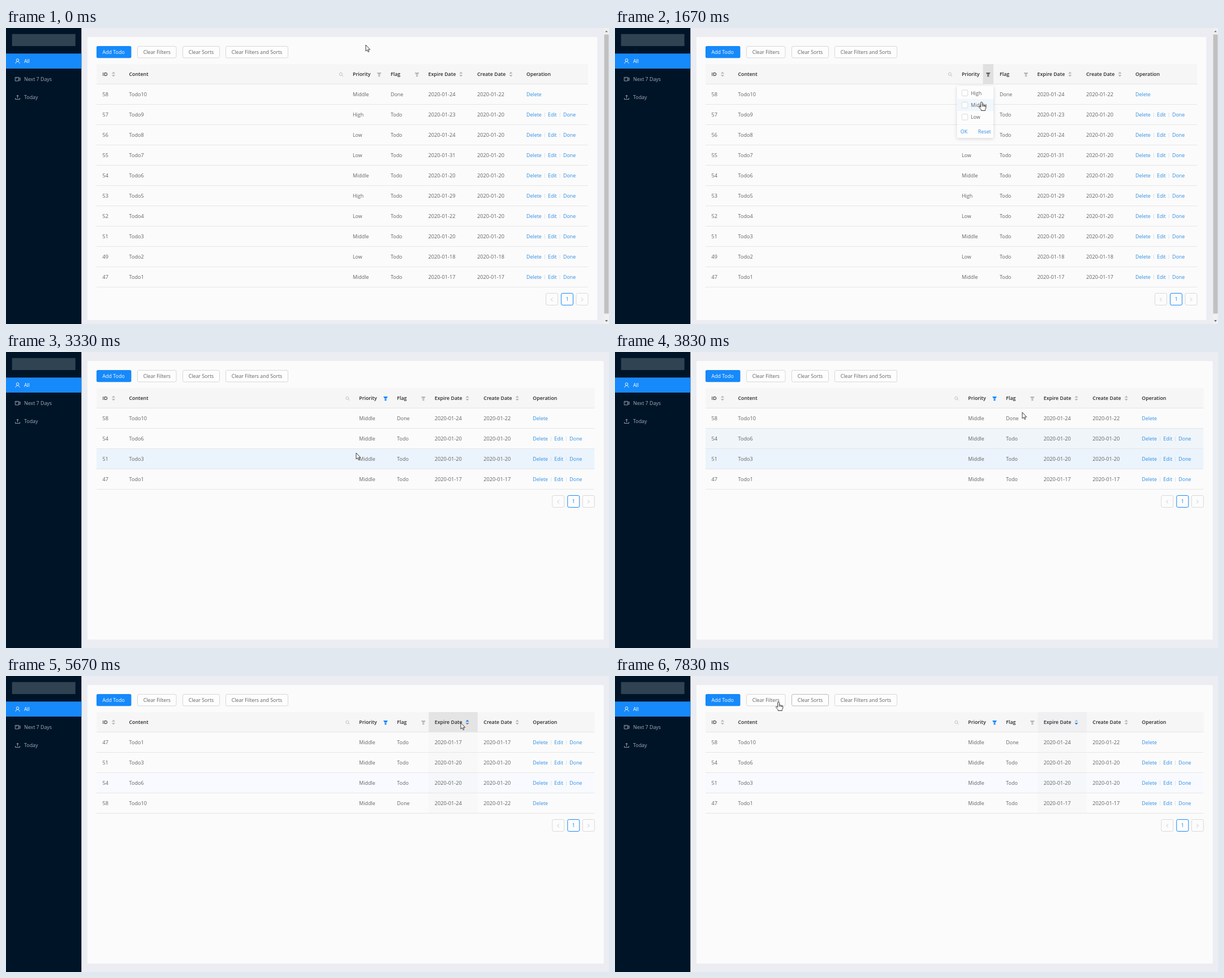
An HTML page with a canvas for the animation above (8000 ms loop, 1066 by 525 pixels).

```html
<!DOCTYPE html>
<html lang="en">
<head>
<meta charset="utf-8">
<title>Todo list</title>
<style>
html, body { margin: 0; width: 100%; height: 100%; overflow: hidden; background: #ebedf2; }
canvas { display: block; }
</style>
</head>
<body>
<canvas id="stage" width="1066" height="525"></canvas>
<script>
const c = document.getElementById('stage').getContext('2d');
const BLUE = '#1689fb', LINK = '#2f8de4', GREY = '#b9b9b9', LINE = '#e6e6e6';
const FAMILY = '"Open Sans", "Noto Sans", sans-serif';

// id, content, priority, flag, expire day, create day
const rows = [
  [58, 10, 'Middle', 'Done', 24, 22], [57, 9, 'High', 'Todo', 23, 20],
  [56, 8, 'Low', 'Todo', 24, 20], [55, 7, 'Low', 'Todo', 31, 20],
  [54, 6, 'Middle', 'Todo', 20, 20], [53, 5, 'High', 'Todo', 29, 20],
  [52, 4, 'Low', 'Todo', 22, 20], [51, 3, 'Middle', 'Todo', 20, 20],
  [49, 2, 'Low', 'Todo', 18, 18], [47, 1, 'Middle', 'Todo', 17, 17]
];
const middle = rows.filter(r => r[2] === 'Middle');

// Pointer path: step, x, y (six steps a second)
const path = [
  [0, 636, 30], [4, 658, 78], [8, 660, 83], [10, 648, 131], [14, 646, 132], [17, 618, 179],
  [20, 619, 179], [21, 628, 172], [23, 720, 107], [27, 806, 83], [29, 806, 83],
  [34, 804, 83], [40, 804, 83], [42, 700, 76], [45, 345, 44], [46, 296, 45], [47, 289, 46]
];
const clicks = [6, 12, 17, 28, 36];

function rect(x, y, w, h, color) {
  c.fillStyle = color;
  c.fillRect(x, y, w, h);
}
function box(x, y, w, h, fill, border, r = 2.5) {
  c.beginPath();
  c.roundRect(x, y, w, h, r);
  c.fillStyle = fill;
  c.fill();
  if (border) stroke(border);
}
function stroke(color, width = 1) {
  c.strokeStyle = color;
  c.lineWidth = width;
  c.stroke();
}
function text(s, x, mid, color = '#626262', size = 8.9, weight = 400) {
  c.font = `${weight} ${size}px ${FAMILY}`;
  c.fillStyle = color;
  c.fillText(s, x, mid + 3.2);
}
function shape(d, x, y, fill, border, width = 1) {
  const p = new Path2D(d);
  c.save();
  c.translate(x, y);
  if (fill) { c.fillStyle = fill; c.fill(p); }
  if (border) { c.strokeStyle = border; c.lineWidth = width; c.stroke(p); }
  c.restore();
}
function sorter(x, up = GREY, down = up) {
  shape('M-3-1L0-4.5L3-1Z', x, 82, up);
  shape('M-3 1L0 4.5L3 1Z', x, 82, down);
}
const funnel = (x, color) => shape('M-4-3.5H4L1.6 .2H-1.6ZM-1.6 .9H1.6V3.8H-1.6Z', x, 82.5, color);

function sidebar() {
  rect(0, 0, 133.3, 525, '#001428');
  rect(10.7, 10.7, 112, 21.3, '#304352');
  rect(0, 45.3, 133.3, 26.7, BLUE);
  const dim = '#a5adb5';
  text('All', 32, 58.7, '#fff');
  text('Next 7 Days', 32, 90.7, dim);
  text('Today', 32, 122.7, dim);
  shape('M-3.6 4.2C-3.4-.2 3.4-.2 3.6 4.2M2.3-1.8A2.3 2.3 0 1 1-2.3-1.8A2.3 2.3 0 1 1 2.3-1.8', 20.5, 58.7, null, '#fff', .9);
  shape('M-4.2-3.2H2V3.2H-4.2ZM2-1L4.6-2.3V2.3L2 1M-2.8-1.4H-1', 20.5, 90.7, null, dim, .9);
  shape('M-4 1.5V3.8H4V1.5M0 1.8V-3.5M-2-1.6L0-3.7L2-1.6', 20.5, 122.7, null, dim, .9);
}

function scrollbar() {
  rect(1057, 0, 9, 525, '#f0f0f1');
  rect(1057.5, 11.5, 8, 495, '#c0c0c1');
  shape('M-2.5 1.3L0-1.5L2.5 1.3Z', 1061.5, 6, '#777');
  shape('M-2.5-1.3L0 1.5L2.5-1.3Z', 1061.5, 519.5, '#555');
}

function buttons(k) {
  box(160, 32, 61.5, 21.3, BLUE, null);
  text('Add Todo', 170.5, 42.7, '#fff');
  const items = [['Clear Filters', 232.5, 68.5], ['Clear Sorts', 312.5, 65], ['Clear Filters and Sorts', 388.5, 110]];
  items.forEach(([label, x, w], i) => {
    box(x, 32.5, w, 20.5, '#fdfdfd', i === 1 && k >= 45 ? '#bdbdbd' : '#d7d7d7');
    text(label, x + 10.2, 42.7, '#626262', 8.8);
  });
}

function header(k, dx, order) {
  const right = 1029 + dx, hover = k >= 26 && k <= 41;
  rect(160, 64, right - 160, 35.5, '#f6f6f7');
  if (k >= 7 && k < 20) rect(650.5, 64, 18.5, 35.5, '#e0e0e0');
  if (hover || order) rect(736 + dx, 64, 86.5, 35.5, hover ? '#e4e4e4' : '#f0eff1');
  const heads = [['ID', 170.5], ['Content', 217.5], ['Priority', 613 + dx], ['Flag', 680 + dx],
    ['Expire Date', 746.5 + dx], ['Create Date', 833 + dx], ['Operation', 920 + dx]];
  for (const [s, x] of heads) text(s, x, 82, '#2b2b2b', 8.8, 600);
  const off = hover ? '#888' : GREY;
  sorter(190);
  sorter(804.3 + dx, order === 1 ? BLUE : off, order === 2 ? BLUE : off);
  sorter(892.5 + dx);
  funnel(659.7 + dx, dx ? BLUE : k >= 7 ? '#666' : GREY);
  funnel(726.5 + dx, GREY);
  shape('M1.7-.6A2.5 2.5 0 1 1-3.3-.6A2.5 2.5 0 1 1 1.7-.6M1 1.2L3.4 3.6', 592.8 + dx, 82.4, null, GREY, .9);
  rect(160, 99, right - 160, 1, LINE);
}

function rowTint(k, i) {
  if (i === 2) return k < 24 ? '#ebf4fc' : '#f8faff';
  return i === 1 && (k === 22 || k === 23) ? '#f0f5fa' : null;
}

function table(k, dx, order) {
  const list = !dx ? rows : order === 1 ? [...middle].reverse() : middle;
  const width = 869 + dx;
  header(k, dx, order);
  list.forEach(([id, n, priority, flag, expire, create], i) => {
    const y = 100 + 36 * i, mid = y + 18;
    const tint = dx && rowTint(k, i);
    if (tint) rect(160, y, width, 35, tint);
    if (order) rect(736 + dx, y, 86.5, 35, i === 2 ? '#f5f7fb' : '#f8f8f8');
    rect(160, y + 35, width, 1, LINE);
    text(id, 170.5, mid, undefined, 9.2);
    text('Todo' + n, 217.5, mid, undefined, 9.1);
    text(priority, 613 + dx, mid);
    text(flag, 680 + dx, mid);
    text('2020-01-' + expire, 746.5 + dx, mid, undefined, 9.2);
    text('2020-01-' + create, 833 + dx, mid, undefined, 9.2);
    text('Delete', 920 + dx, mid, LINK);
    if (flag === 'Todo') {
      text('Edit', 958 + dx, mid, LINK);
      text('Done', 985 + dx, mid, LINK);
      rect(952 + dx, mid - 4, .8, 8, '#dedede');
      rect(978.7 + dx, mid - 4, .8, 8, '#dedede');
    }
  });
  pager(dx, 110.5 + 36 * list.length);
}

function pager(dx, y) {
  [954.5, 981.5, 1008].forEach((x, i) =>
    box(x + dx, y, 21, 21, '#fcfcfc', i === 1 ? BLUE : '#d9d9d9'));
  text('1', 989.4 + dx, y + 10.6, BLUE, 9.2);
  shape('M1.8-3L-1.8 0L1.8 3', 965 + dx, y + 11, null, '#c4c4c4', .9);
  shape('M-1.8-3L1.8 0L-1.8 3', 1018.5 + dx, y + 11, null, '#c4c4c4', .9);
}

function popup(k) {
  c.save();
  c.globalAlpha = k === 7 ? .5 : 1;
  c.save();
  c.shadowColor = 'rgba(0,0,0,.16)';
  c.shadowBlur = 6;
  c.shadowOffsetY = 1.5;
  box(604.5, 102.5, 64.5, 92.5, '#fdfdfd', null);
  c.restore();
  const checked = k >= 13;
  if (k >= 10) rect(604.5, 126, 64.5, 21.3, checked ? '#e6f4fe' : '#f0f7fd');
  ['High', 'Middle', 'Low'].forEach((s, i) => {
    const mid = 115.3 + 21.3 * i, on = checked && i === 1;
    box(613.3, mid - 5.2, 10.4, 10.4, on ? BLUE : '#fff', on ? BLUE : '#d9d9d9', 1.5);
    if (on) shape('M-2.7 0L-.7 2.1L2.8-2.2', 618.5, mid, null, '#fff', 1.4);
    text(s, 629, mid, on ? BLUE : '#626262');
  });
  rect(604.5, 171, 64.5, .7, '#ececec');
  text('OK', 610.8, 184, LINK);
  text('Reset', 641.7, 184, LINK);
  c.restore();
}

function pointerAt(k) {
  const i = Math.max(1, path.findIndex(p => p[0] >= k));
  const [k0, x0, y0] = path[i - 1], [k1, x1, y1] = path[i];
  const u = (k - k0) / (k1 - k0);
  return [x0 + (x1 - x0) * u, y0 + (y1 - y0) * u];
}

function pointer(k) {
  const [x, y] = pointerAt(k);
  const age = k - clicks.findLast(s => s <= k);
  if (age >= 0 && age < 3) {
    c.beginPath();
    c.arc(x, y + (k < 20 ? 6 : 0), 4 + 7 * age, 0, 7);
    if (age) stroke(`rgba(250,215,60,${[0, .4, .15][age]})`, 2);
    else { c.fillStyle = 'rgba(250,210,40,.8)'; c.fill(); }
  }
  if ((k >= 4 && k < 20) || k >= 45)
    shape('M-1.4 9.6V1Q0-1 1.4 1V5.6Q2.8 4.8 3.8 6Q5 5.4 5.8 6.7Q7.6 6.3 7.8 8.2V11L6.4 13.5V15.5H-.6V14L-4.4 9.6Q-4.6 7.4-2.8 8.2ZM1.4 5.6V8.5M3.8 6V8.8M5.8 6.7V9', x, y, '#fff', '#222', .9);
  else
    shape('M0 0V11L2.5 8.8L4.2 12.6L5.9 11.8L4.2 8.2H7.6Z', x, y, '#fff', '#222', .9);
}

function draw() {
  const t = performance.now() % 8000;
  const k = Math.min(47, Math.floor((t + 4) * .006));
  const dx = k >= 20 ? 11.3 : 0;
  const order = k < 30 ? 0 : k < 38 ? 1 : 2;
  rect(0, 0, 1066, 525, '#ebedf2');
  sidebar();
  rect(144, 16, 901.3 + dx, dx ? 494 : 502, '#fbfbfb');
  if (!dx) scrollbar();
  buttons(k);
  table(k, dx, order);
  if (k >= 7 && k < 20) popup(k);
  pointer(k);
  requestAnimationFrame(draw);
}
draw();
</script>
</body>
</html>
```
